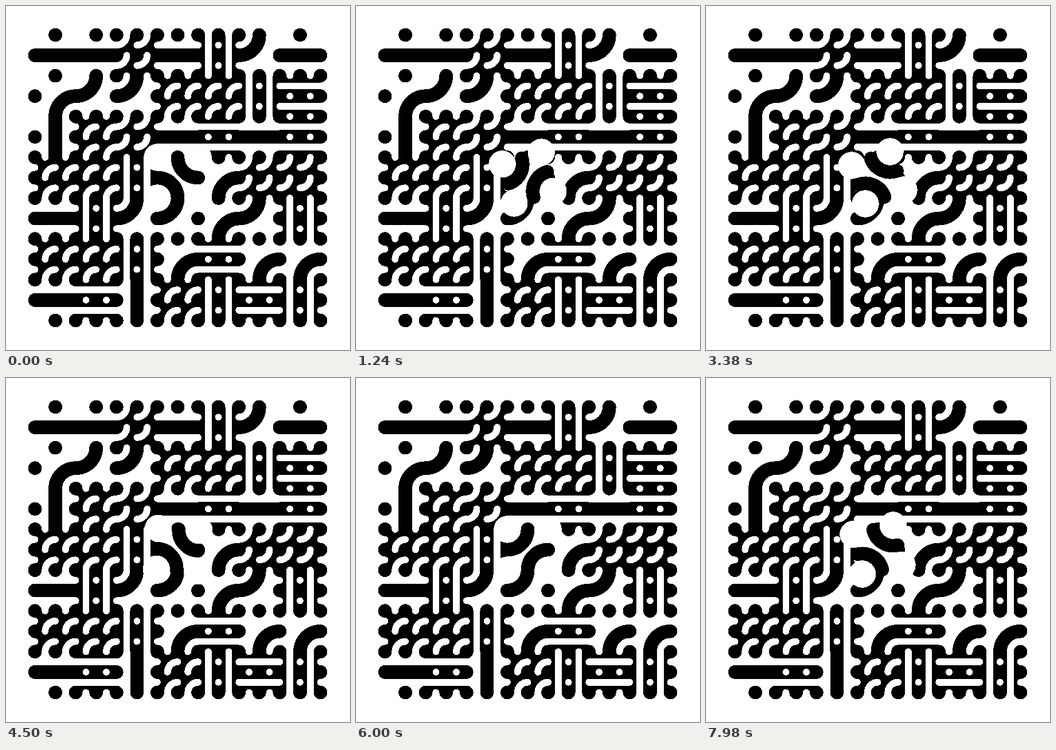
These frames come from a looping animation (600 px wide and 600 px high, 8 s). An HTML page:

```html
<!DOCTYPE html>
<html lang="en">
<head>
<meta charset="utf-8">
<title>Two-scale Truchet tiles</title>
<style>
  html, body { margin: 0; width: 100%; height: 100%; overflow: hidden; background: #fff; }
  svg { display: block; width: 100vw; height: 100vh; }
  path { fill: none; stroke-width: .33333; stroke-linecap: round; }
</style>
</head>
<body>
<svg id="stage" viewBox="0 0 600 600" shape-rendering="crispEdges"></svg>
<script>
const COUNT = 7, SIZE = 498 / COUNT, CENTER = 299.5, LOOP = 8000;
const ORIGIN = CENTER - SIZE * COUNT / 2;

// Lower case: one large black-on-white tile. Upper case: four small inverted ones.
const MAP = [
  'hhNhVnh',
  'snnSSVH',
  'vSNhHhH',
  'SSVcsNN',
  'hVnnsnV',
  'SSVsHss',
  'hHvSVHV'
];

// Motifs in a unit tile centred on 0,0
const N = 'M0-.5h0', S = 'M0 .5h0', W = 'M-.5 0h0', E = 'M.5 0h0';
const ARC = 'A.5 .5 0 0 0 ';
const MOTIF = {
  h: 'M-.5 0H.5' + N + S,
  v: 'M0-.5V.5' + W + E,
  s: 'M.5 0' + ARC + '0 .5' + N + W,
  n: 'M-.5 0' + ARC + '0-.5' + S + E,
  c: 'M0-.5' + ARC + '.5 0M0 .5' + ARC + '-.5 0'
};

const place = (x, y, size, body) =>
  `<g transform="translate(${x} ${y}) scale(${size})">${body}</g>`;

const motif = (kind, color) => `<path d="${MOTIF[kind]}" stroke="${color}"/>`;

// Square with its four corner wings, a hair oversized so neighbours leave no seam
function base(color) {
  const half = .501;
  let out = `<rect x="${-half}" y="${-half}" width="${2 * half}" height="${2 * half}" fill="${color}"/>`;
  for (const x of [-.5, .5])
    for (const y of [-.5, .5])
      out += `<circle cx="${x}" cy="${y}" r=".33333" fill="${color}"/>`;
  return out;
}

function build() {
  let large = '', smallBase = '', smallMotif = '';
  MAP.forEach((row, r) => [...row].forEach((key, c) => {
    const x = ORIGIN + (c + .5) * SIZE, y = ORIGIN + (r + .5) * SIZE;
    const kind = key.toLowerCase();
    if (kind === 'c') return;
    if (kind === key) {
      large += place(x, y, SIZE, motif(kind, '#000'));
      return;
    }
    for (const dx of [-.25, .25])
      for (const dy of [-.25, .25]) {
        const sx = x + dx * SIZE, sy = y + dy * SIZE;
        smallBase += place(sx, sy, SIZE / 2, base('#000'));
        smallMotif += place(sx, sy, SIZE / 2, motif(kind, '#fff'));
      }
  }));
  const spinner = place(CENTER, CENTER, SIZE, base('#fff') + motif('c', '#000'));
  return large + smallBase + smallMotif + `<g id="spin">${spinner}</g>`;
}

document.getElementById('stage').innerHTML = build();
const spin = document.getElementById('spin');

// Uneven clock: ticks last 20, 100 and 20 ms in turn
function tick(t) {
  const rest = t % 140;
  return 3 * Math.floor(t / 140) + (rest < 20 ? 0 : rest < 120 ? 1 : 2);
}

// Each quarter turn takes 32 ticks
const STARTS = [0, 48, 96, 143.5];

function draw(t) {
  const i = tick(t);
  const turns = STARTS.reduce((sum, s) => sum + Math.min(1, Math.max(0, (i - s) / 32)), 0);
  spin.setAttribute('transform', `rotate(${turns * 90} ${CENTER} ${CENTER})`);
}

const begin = performance.now();
function loop() {
  draw((performance.now() - begin) % LOOP);
  requestAnimationFrame(loop);
}
draw(0);
requestAnimationFrame(loop);
</script>
</body>
</html>
```
